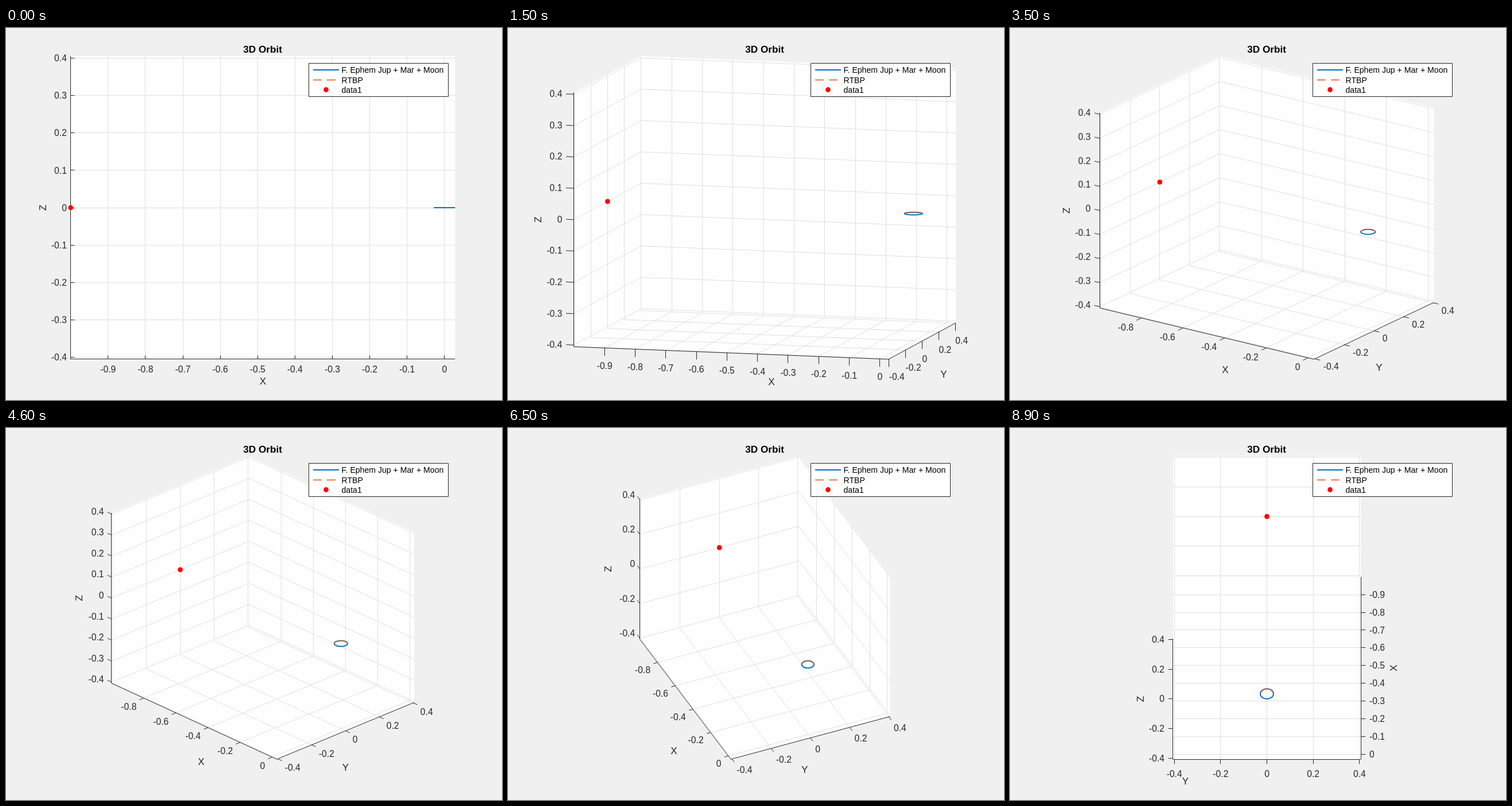
Recreate the animation shown at these times as an HTML page with a canvas. Size 864x648 px, loop 9000 ms.

```html
<!DOCTYPE html>
<html lang="en">
<head>
<meta charset="utf-8">
<title>3D Orbit</title>
<style>
html, body { margin: 0; width: 100%; height: 100%; overflow: hidden; background: #f0f0f0; }
canvas { display: block; }
</style>
</head>
<body>
<canvas id="stage" width="864" height="648"></canvas>
<script>
const ctx = document.getElementById('stage').getContext('2d');
const STEPS = 90, STEP_MS = 100;
const CX = 447.5, CY = 313, WIDTH = 669.6, HEIGHT = 528;
const X0 = -1, X1 = 0.0285, R = 0.4055, RANGE = X1 - X0, ORBIT = 0.0285;
const PAPER = '#fefefe', INK = '#262626', GRID = '#dfdfdf';
const BLUE = '#0072bd', ORANGE = '#d95319', RED = '#f00';
const FONT = '"Liberation Sans", Arial, sans-serif';

// Axis label offsets from the middle of the axis: [step, dx, dy]
const X_LABEL = [[1, 95, 46], [8, 83, 47], [22, 57, 53], [35, 32, 62], [46, 12, 70], [65, -20, 89], [88, -60, 110]];
const Y_LABEL = [[1, 53, 46], [8, 50, 54], [22, 25, 62], [35, 9, 63], [46, 0, 63], [65, -10, 55], [88, -45, 39]];

function offsetAt(keys, i) {
  const n = Math.max(1, keys.findIndex(k => k[0] >= i));
  const a = keys[n - 1], b = keys[n], f = (i - a[0]) / (b[0] - a[0]);
  return [a[1] + (b[1] - a[1]) * f, a[2] + (b[2] - a[2]) * f];
}

function text(str, x, y, size, align = 'center', color = INK, weight = '') {
  ctx.font = `${weight} ${size}px ${FONT}`;
  ctx.textAlign = align;
  ctx.fillStyle = color;
  ctx.fillText(str, x, y + size * 0.358);
}

function upright(str, x, y) {
  ctx.save();
  ctx.translate(x, y);
  ctx.rotate(-Math.PI / 2);
  text(str, 0, 0, 17.2);
  ctx.restore();
}

function dot(x, y) {
  ctx.fillStyle = RED;
  ctx.beginPath();
  ctx.arc(x, y, 4.4, 0, 7);
  ctx.fill();
}

// Adds a thin line to the path; upright and level lines sit on whole pixels
function line([x1, y1], [x2, y2]) {
  if (Math.abs(x1 - x2) < 0.3) x1 = x2 = Math.floor(x1) + 0.5;
  if (Math.abs(y1 - y2) < 0.3) y1 = y2 = Math.floor(y1) + 0.5;
  ctx.moveTo(x1, y1);
  ctx.lineTo(x2, y2);
}

function stroke(color, width, draw) {
  ctx.strokeStyle = color;
  ctx.lineWidth = width;
  ctx.beginPath();
  draw();
  ctx.stroke();
}

function ticks(lo, hi, step) {
  const out = [];
  for (let k = Math.ceil(lo / step + 0.01); k * step <= hi; k++) out.push(k * step);
  return out;
}

const format = v => Math.abs(v) < 0.01 ? '0' : v.toFixed(1);

function sample(color, width, x1, x2, y) {
  stroke(color, width, () => {
    ctx.moveTo(x1, y);
    ctx.lineTo(x2, y);
  });
}

function legend() {
  ctx.fillStyle = PAPER;
  ctx.fillRect(527.5, 61.5, 243, 58);
  stroke(INK, 1, () => ctx.rect(527.5, 61.5, 243, 58));
  sample(BLUE, 2, 535, 580, 73);
  ctx.setLineDash([15, 9]);
  sample(ORANGE, 1.5, 535, 575, 90.5);
  ctx.setLineDash([]);
  dot(557.5, 107.5);
  ['F. Ephem Jup + Mar + Moon', 'RTBP', 'data1'].forEach((s, n) =>
    text(s, 584.5, 73 + n * 17.6, 14.1, 'left', '#000'));
}

function draw(i) {
  const flat = i === 0, end = i === STEPS - 1;
  const turn = i / (STEPS - 1), az = turn * Math.PI / 2, el = turn * 50 * Math.PI / 180;
  const ca = Math.cos(az), sa = Math.sin(az), ce = Math.cos(el), se = Math.sin(el);
  const low = turn * 50 < 9;

  const w = RANGE * ca + 2 * R * sa;
  const h = 2 * R * ce + (RANGE * sa + 2 * R * ca) * se;
  const scale = Math.min(WIDTH / w, HEIGHT / h);
  const shift = (x, y, z) => [scale * (x * ca + y * sa), scale * ((x * sa - y * ca) * se - z * ce)];
  const project = (x, y, z) => {
    const [dx, dy] = shift(x - (X0 + X1) / 2, y, z);
    return [CX + dx, CY + dy];
  };
  const unit = (...v) => {
    const [x, y] = shift(...v), len = Math.hypot(x, y) || 1;
    return [x / len, y / len];
  };

  ctx.fillStyle = '#f0f0f0';
  ctx.fillRect(0, 0, 864, 648);

  // Walls
  const walls = [
    [[X0, R, -R], [X1, R, -R], [X1, R, R], [X0, R, R]],
    [[X0, -R, -R], [X0, R, -R], [X0, R, R], [X0, -R, R]],
    [[X0, -R, -R], [X1, -R, -R], [X1, R, -R], [X0, R, -R]]
  ];
  ctx.fillStyle = PAPER;
  for (const wall of walls) {
    ctx.beginPath();
    wall.forEach(p => ctx.lineTo(...project(...p)));
    ctx.fill();
  }

  // Grid
  const xs = ticks(X0, X1, i < 27 || end ? 0.1 : 0.2);
  const ys = ticks(-R, R, 0.2);
  const zs = ticks(-R, R, i < 63 ? 0.1 : 0.2);
  const edge = (a, b) => line(project(...a), project(...b));
  stroke(GRID, 1, () => {
    for (const x of xs) {
      if (!end) edge([x, R, -R], [x, R, R]);
      edge([x, -R, -R], [x, R, -R]);
    }
    for (const y of ys) {
      edge([X0, y, -R], [X1, y, -R]);
      edge([X0, y, -R], [X0, y, R]);
    }
    for (const z of zs) {
      edge([X0, -R, z], [X0, R, z]);
      if (!end) edge([X0, R, z], [X1, R, z]);
    }
  });

  // Axes
  const xAxis = v => project(v, end ? R : -R, -R);
  const yAxis = v => project(X1, v, -R);
  const zAxis = v => project(end ? X1 : X0, -R, v);
  const length = (axis, a, b) => {
    const p = axis(a), q = axis(b);
    return Math.hypot(p[0] - q[0], p[1] - q[1]);
  };
  const longest = Math.max(length(xAxis, X0, X1), length(yAxis, -R, R), length(zAxis, -R, R));
  const tick = longest * (flat ? -0.01 : 0.025);
  const out = Math.max(tick, 0);

  function ruler(axis, lo, hi, values, dir, label) {
    stroke(INK, 1, () => {
      line(axis(lo), axis(hi));
      for (const v of values) {
        const p = axis(v);
        line(p, [p[0] + dir[0] * tick, p[1] + dir[1] * tick]);
      }
    });
    for (const v of values) {
      const p = axis(v);
      label(format(v), p[0] + dir[0] * out, p[1] + dir[1] * out, dir);
    }
  }

  const below = align => (s, x, y) => text(s, x, y + 17, 15.7, align);
  const slanted = side => (s, x, y, d) =>
    text(s, x + side * 2 + d[0] * 3.5, y + 10.2 + d[1] * 4, 15.7, side < 0 ? 'right' : 'left');
  const beside = align => (s, x, y, d) => text(s, x + d[0] * 6.8, y + d[1] * 4, 15.7, align);
  const down = unit(0, 0, -1);

  ruler(zAxis, -R, R, zs, end ? unit(0, -1, 0) : unit(-1, 0, 0), beside('right'));
  ruler(xAxis, X0, X1, xs, low ? down : unit(0, end ? 1 : -1, 0),
    low ? below('center') : end ? beside('left') : slanted(-1));
  if (!flat) {
    ruler(yAxis, -R, R, ys, low ? down : unit(1, 0, 0),
      low ? below('left') : end ? below('center') : slanted(1));
  }

  // Axis names
  const [zx, zy] = zAxis(0), [xx, xy] = xAxis((X0 + X1) / 2), [yx, yy] = yAxis(0);
  upright('Z', zx - out - 48.9, zy);
  if (end) {
    upright('X', xx + out + 48.7, xy);
  } else {
    const [dx, dy] = flat ? [0, 37.5] : offsetAt(X_LABEL, i);
    text('X', xx + dx, xy + dy, 17.2);
  }
  if (!flat) {
    const [dx, dy] = end ? [-142, 38] : offsetAt(Y_LABEL, i);
    text('Y', yx + dx, yy + dy, 17.2);
  }
  text('3D Orbit', CX - 0.4, CY - h * scale / 2 - 12.6, 17.2, 'center', '#000', 'bold');

  // Orbits
  const [ox, oy] = project(0, 0, 0), rx = ORBIT * scale;
  stroke(BLUE, 2, () => ctx.ellipse(ox, oy, rx, rx * se, 0, 0, Math.PI * 2));
  if (!flat) {
    ctx.setLineDash([7, 3]);
    stroke(ORANGE, 1.5, () => ctx.ellipse(ox, oy, rx, rx * se, 0, 0, Math.PI, true));
    ctx.setLineDash([]);
  }
  dot(...project(X0, 0, 0));
  legend();
}

const start = performance.now();
function loop() {
  draw(Math.floor((performance.now() - start) / STEP_MS) % STEPS);
  requestAnimationFrame(loop);
}
loop();
</script>
</body>
</html>
```
